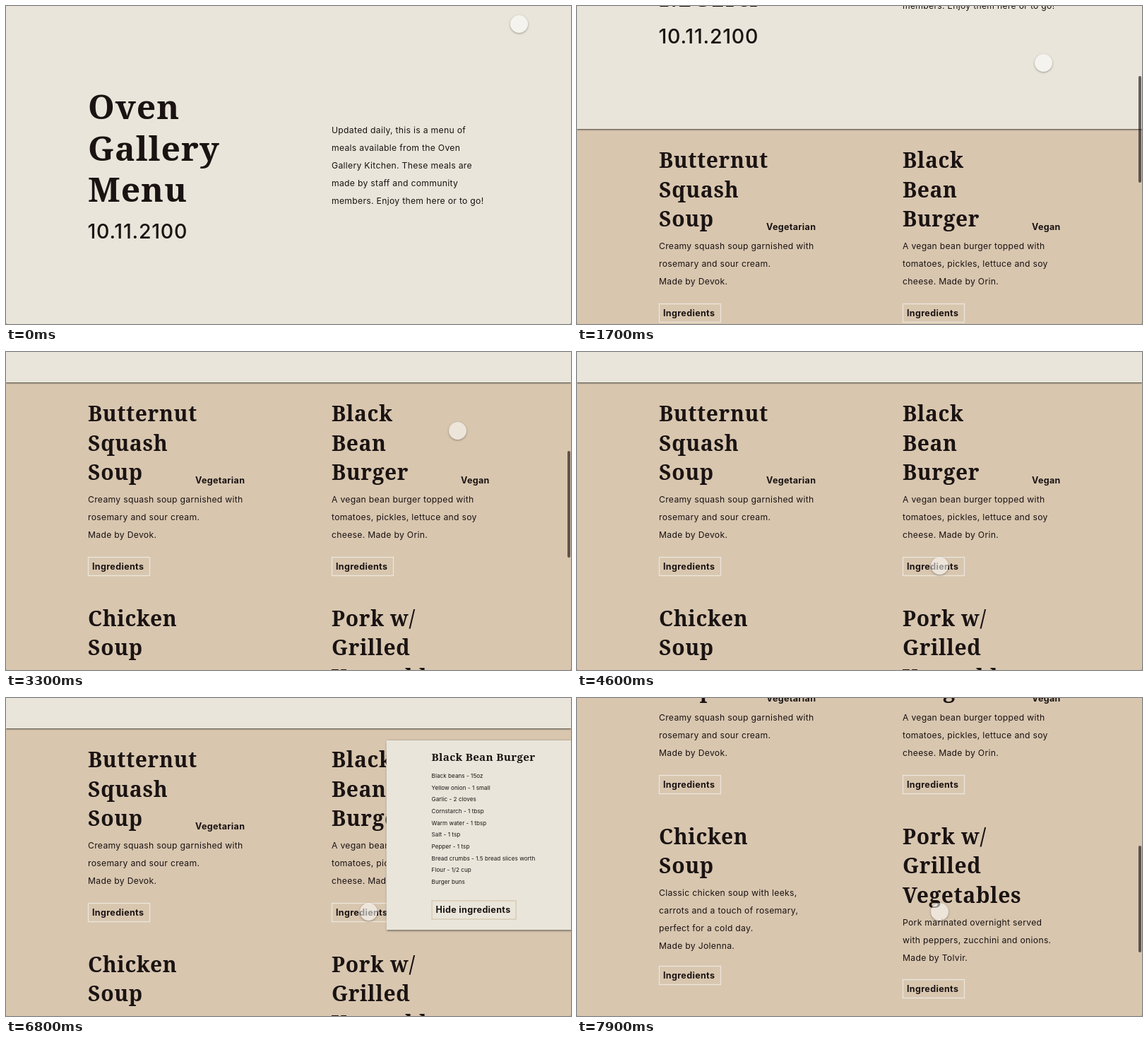
An HTML page for the animation above (8 s loop, 800 px wide and 450 px high).

```html
<!DOCTYPE html>
<html lang="en">
<head>
<meta charset="utf-8">
<title>Daily menu</title>
<style>
  html, body { margin: 0; width: 100%; height: 100%; overflow: hidden; background: #77736d; }
  div, svg { position: absolute; box-sizing: border-box; }
  #stage { width: 800px; height: 450px; overflow: hidden; background: #d8c6af; border-radius: 0 0 2px 2px; }
  #page { width: 800px; height: 1350px; }
  #meals { top: 450px; width: 800px; height: 900px; background: #d8c6af; }
  #hero { width: 800px; height: 450px; background: #e9e5da; box-shadow: 0 1px 2px rgba(0, 0, 0, .7); }
  #card { left: 403px; top: 17.5px; width: 338px; height: 268px; background: #e9e5da; box-shadow: 0 1px 3px rgba(0, 0, 0, .6); }
  #bar { left: 795px; width: 4px; height: 151px; border-radius: 2px; background: rgba(20, 12, 12, .62); }
  #cursor { width: 25px; height: 25px; margin: -12.5px; border-radius: 50%; background: rgba(255, 255, 255, .54); box-shadow: 0 1px 3px rgba(0, 0, 0, .35); }
  svg { left: 0; top: 0; overflow: visible; }
  text { fill: #1a1312; white-space: pre; }
  .title, .head, .name { font-family: "Noto Serif", serif; font-weight: 700; }
  .title { font-size: 48px; letter-spacing: 1px; }
  .head { font-size: 30px; letter-spacing: .6px; }
  .name { font-size: 15.2px; letter-spacing: .3px; }
  .date { font: 500 28.5px Inter, sans-serif; letter-spacing: .75px; }
  .body { font: 12.2px Inter, sans-serif; letter-spacing: .29px; }
  .item { font: 8.1px Inter, sans-serif; letter-spacing: .05px; }
  .bold { font: 700 12.5px Inter, sans-serif; letter-spacing: .35px; }
  rect { fill: none; }
</style>
</head>
<body>
<div id="stage">
  <div id="page">
    <div id="meals">
      <svg id="mealText" width="800" height="900"></svg>
      <div id="card"><svg id="cardText" width="338" height="268"></svg></div>
    </div>
    <div id="hero"><svg id="heroText" width="800" height="450"></svg></div>
  </div>
  <div id="bar"></div>
  <div id="cursor"></div>
</div>
<script>
const $ = id => document.getElementById(id);

function add(parent, tag, attrs, content = '') {
  const el = document.createElementNS('http://www.w3.org/2000/svg', tag);
  for (const key in attrs) el.setAttribute(key, attrs[key]);
  el.textContent = content;
  parent.append(el);
}

// Text lines separated by "|", placed by their baselines
function lines(parent, style, x, y, step, copy) {
  copy.split('|').forEach((line, i) =>
    add(parent, 'text', { class: style, x, y: y + i * step }, line));
}

function button(parent, x, y, width, stroke, label) {
  add(parent, 'rect', { x: x + .5, y: y + .5, width: width - 1, height: 26, stroke, 'stroke-width': 1.3 });
  lines(parent, 'bold', x + 6, y + 17.5, 0, label);
}

function meal(x, y, name, bodyY, about, buttonY) {
  const svg = $('mealText');
  lines(svg, 'head', x, y, 41.7, name);
  lines(svg, 'body', x, bodyY, 25, about);
  button(svg, x, buttonY, 88, '#ece6db', 'Ingredients');
}

const hero = $('heroText'), card = $('cardText');
lines(hero, 'title', 116, 160, 58.5, 'Oven|Gallery|Menu');
lines(hero, 'date', 115.5, 329, 0, '10.11.2100');
lines(hero, 'body', 461, 180, 25, 'Updated daily, this is a menu of|meals available from the Oven|Gallery Kitchen. These meals are|made by staff and community|members. Enjoy them here or to go!');

meal(116, 55, 'Butternut|Squash|Soup', 170, 'Creamy squash soup garnished with|rosemary and sour cream.|Made by Devok.', 247);
meal(461, 55, 'Black|Bean|Burger', 170, 'A vegan bean burger topped with|tomatoes, pickles, lettuce and soy|cheese. Made by Orin.', 247);
meal(116, 344.5, 'Chicken|Soup', 418, 'Classic chicken soup with leeks,|carrots and a touch of rosemary,|perfect for a cold day.|Made by Jolenna.', 517);
meal(461, 344.5, 'Pork w/|Grilled|Vegetables', 460, 'Pork marinated overnight served|with peppers, zucchini and onions.|Made by Tolvir.', 536);
lines($('mealText'), 'bold', 268, 142.5, 0, 'Vegetarian');
lines($('mealText'), 'bold', 644, 142.5, 0, 'Vegan');

lines(card, 'name', 64, 29, 0, 'Black Bean Burger');
lines(card, 'item', 64, 53, 16.67, 'Black beans - 15oz|Yellow onion - 1 small|Garlic - 2 cloves|Cornstarch - 1 tbsp|Warm water - 1 tbsp|Salt - 1 tsp|Pepper - 1 tsp|Bread crumbs - 1.5 bread slices worth|Flour - 1/2 cup|Burger buns');
button(card, 64, 226.5, 120, '#d8c6af', 'Hide ingredients');

const ramp = (t, start, length) => Math.min(1, Math.max(0, (t - start) / length));
const smooth = (t, start, length) => {
  const p = ramp(t, start, length);
  return p * p * (3 - 2 * p);
};
const scrollAt = t =>
  300 * (1 - (1 - ramp(t, 1025, 940)) ** 2) +
  107.5 * smooth(t, 2140, 650) +
  317 * smooth(t, 7300, 1100);

function draw(now) {
  const t = now % 8000;
  $('page').style.top = -scrollAt(t) + 'px';

  // The scrollbar runs slightly ahead of the page
  $('bar').style.top = 3 + .336 * scrollAt(t + 60) + 'px';
  $('bar').style.opacity = ramp(t, 1000, 100) - ramp(t, 3450, 250) + ramp(t, 7300, 100);

  const shown = smooth(t, 4600, 770) - smooth(t, 6500, 770);
  $('card').style.transform = `translateX(${400 * (1 - shown)}px)`;

  const first = smooth(t, 100, 800), second = smooth(t, 3000, 1280);
  $('cursor').style.left = 726.5 - 66 * first - 147 * second + 'px';
  $('cursor').style.top = 25 + 55.5 * first + 222 * second + 'px';
  requestAnimationFrame(draw);
}
requestAnimationFrame(draw);
</script>
</body>
</html>
```
